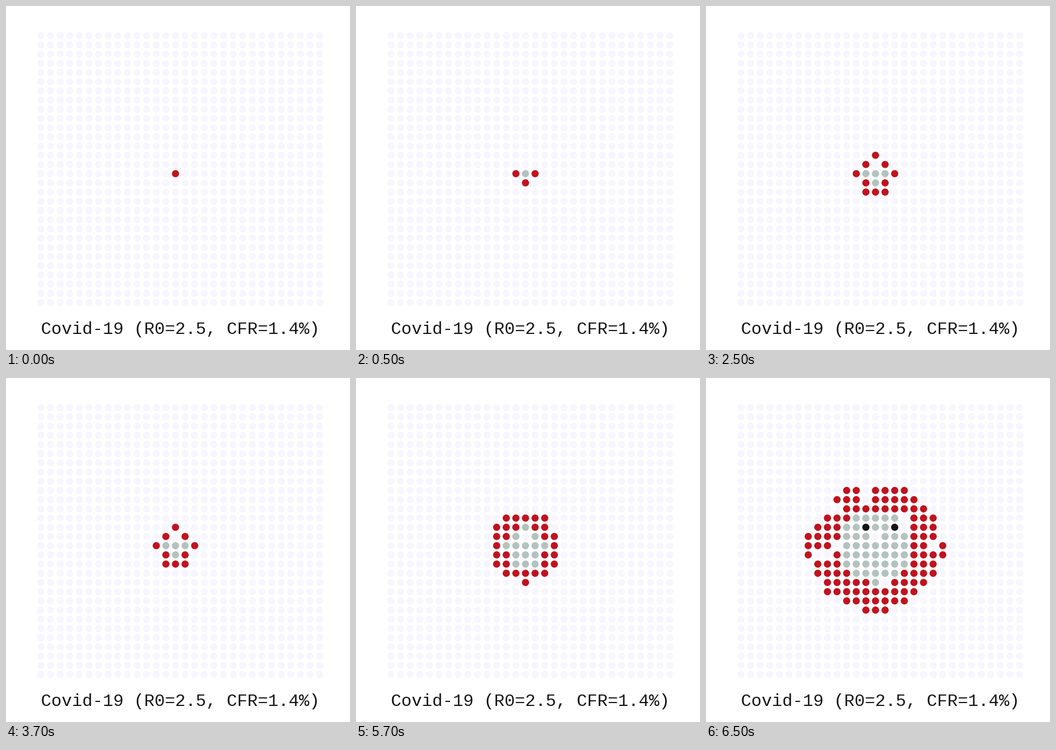
A matplotlib script for the animation above (8 s loop, 600 by 600 pixels).

```python
from math import hypot

import matplotlib.pyplot as plt
from matplotlib.animation import FuncAnimation
from matplotlib.collections import PatchCollection
from matplotlib.patches import Circle

SIZE, DPI = 600, 100
COLS = ROWS = 30
FIRST_COL, FIRST_ROW = 14, 15
FIRST_X, FIRST_Y = 295.6, 292.45
STEP_X, STEP_Y = 16.76, 16.05
DOT_RADIUS = 6.25

HEALTHY, INFECTED, RECOVERED, DEAD = "#f7f5ff", "#c1121f", "#b3c2bf", "#141414"

# The outbreak is a disc, slightly below the first case, growing by a
# constant factor each generation. A few people inside it never catch it.
START_REACH, GROWTH, DRIFT = 0.6754, 1.8, 0.1
GENERATIONS = 5
IMMUNE = {(0, -1), (3, -3), (3, -2), (-1, -6), (-1, -5), (-5, -4), (-4, -4),
          (-6, -3), (7, -1), (-4, 0), (6, 0), (-6, 1), (-5, 1), (1, 4), (5, 5)}
FATAL = {(-1, -2), (2, -2)}


def generation_caught(cell):
    """Generation in which the growing disc reaches a cell, or None."""
    x, y = cell
    if cell in IMMUNE:
        return None
    distance = hypot(x, y - DRIFT)
    return next((g for g in range(GENERATIONS)
                 if distance <= START_REACH * GROWTH ** g), None)


CELLS = [(c - FIRST_COL, r - FIRST_ROW) for r in range(ROWS) for c in range(COLS)]
CAUGHT = {cell: generation_caught(cell) for cell in CELLS}


def cell_color(cell, generation):
    caught = CAUGHT[cell]
    if caught is None or caught > generation:
        return HEALTHY
    if caught == generation:
        return INFECTED
    return DEAD if cell in FATAL else RECOVERED


fig = plt.figure(figsize=(SIZE / DPI, SIZE / DPI), dpi=DPI, facecolor="white")
ax = fig.add_axes([0, 0, 1, 1])
ax.set(xlim=(0, SIZE), ylim=(SIZE, 0))
ax.axis("off")

people = PatchCollection(
    [Circle((FIRST_X + STEP_X * x, FIRST_Y + STEP_Y * y), DOT_RADIUS) for x, y in CELLS],
    linewidths=0)
ax.add_collection(people)
ax.text(61, 572.5, "Covid-19 (R0=2.5, CFR=1.4%)", family="Liberation Mono",
        size=30 * 72 / DPI, color="#141414", ha="left", va="baseline")


def update(frame):
    generation = (frame + 3) // 4  # four frames each, the first one shortened
    people.set_facecolor([cell_color(cell, generation) for cell in CELLS])
    return (people,)


anim = FuncAnimation(fig, update, frames=16, interval=500, repeat=True, repeat_delay=0)
plt.show()
```
